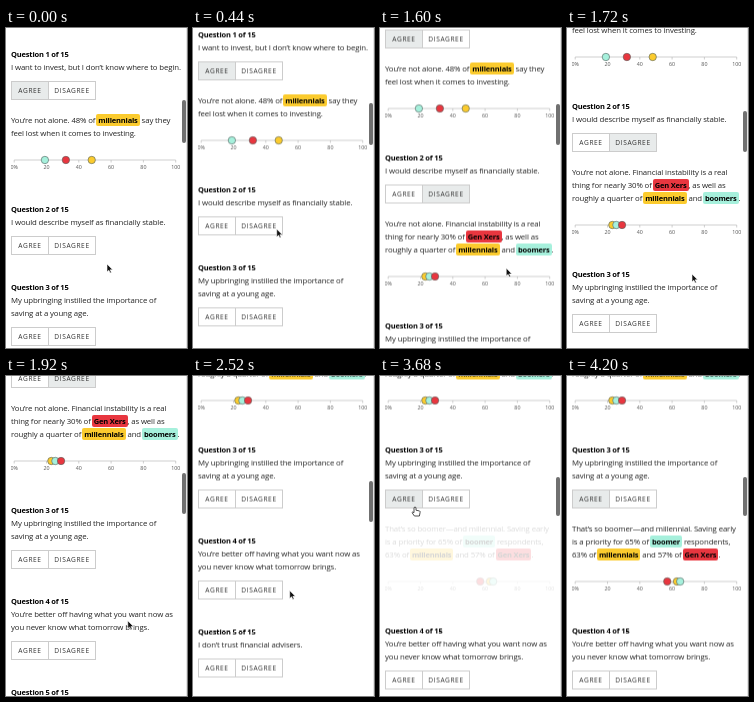
Write an HTML page that moves like this. It is 181x320 px and loops after 4.32 s.

```html
<!DOCTYPE html>
<html lang="en">
<meta charset="utf-8">
<style>
html, body { margin: 0; width: 100%; height: 100%; overflow: hidden; background: #fff; }
#stage { position: relative; width: 181px; height: 320px; overflow: hidden; color: #222;
  font: 7.8px/13px "Open Sans", "Noto Sans", sans-serif; letter-spacing: -.12px; white-space: nowrap; }
#page { position: absolute; left: 5px; top: 20px; will-change: transform; }
.q { margin-bottom: 26px; }
h2, b { font-size: 7.5px; font-weight: 700; letter-spacing: -.18px; color: #000; }
h2 { margin: 0; line-height: 13px; }
.buttons { display: flex; width: 85px; height: 19px; margin-top: 7px; box-sizing: border-box; border: 1px solid #ccc; }
.buttons span { width: 36px; font-size: 6.6px; line-height: 17px; letter-spacing: .6px; text-align: center; color: #333; }
.buttons span + span { flex: 1; border-left: 1px solid #ccc; }
.buttons .on { background: #e8ebeb; }
.answer { height: 0; overflow: hidden; opacity: 0; width: 171px; }
.answer p { margin: 14px 0 0; }
b { margin-left: -1px; padding: 1px 2px; border-radius: 2px; }
.answer svg { display: block; margin-top: 12px; }
.answer text { font-size: 5.3px; letter-spacing: 0; fill: #555; text-anchor: middle; }
#edge { position: absolute; right: 0; top: 0; width: 1px; height: 100%; background: #e4e4e4; }
#thumb { position: absolute; left: 176px; width: 4px; border-radius: 2px; background: #707070; }
#cursor { position: absolute; left: 0; top: 0; overflow: visible; }
</style>
<div id="stage">
  <div id="page"></div>
  <div id="edge"></div>
  <div id="thumb"></div>
  <svg id="cursor" width="12" height="14" stroke-linejoin="round">
    <path id="arrow" d="M0 0V8L1.9 6.3L3.1 9L4.4 8.4L3.2 5.8H5.7Z" fill="#111" stroke="#fff" stroke-width=".6"/>
    <path id="beam" d="M-1.8 -4.5Q0 -4.5 0 -3.2Q0 -4.5 1.8 -4.5M0 -3.2V3.2M-1.8 4.5Q0 4.5 0 3.2Q0 4.5 1.8 4.5M-1 1H1" fill="none" stroke="#222" stroke-width=".9"/>
    <path id="hand" d="M-1 .6Q0 -.6 1 .6V3.2L4.6 4Q5.3 4.3 5.1 5.4L4.4 9H-.6L-3 5.6Q-2.6 4.4 -1 5.6Z" fill="#fff" stroke="#222" stroke-width=".8"/>
  </svg>
</div>
<script>
const LOOP = 4320;
const colors = { yellow: '#fbcb2e', red: '#e8363f', mint: '#a6f0dc' };
const $ = id => document.getElementById(id);
const mark = (color, word) => `<b style="background:${colors[color]}">${word}</b>`;
const mill = mark('yellow', 'millennials'), xers = mark('red', 'Gen Xers');

const questions = [
  { text: ['I want to invest, but I don’t know where to begin.'], pick: 0, at: -1000,
    answer: [`You’re not alone. 48% of ${mill} say they`, 'feel lost when it comes to investing.'],
    dots: [['mint', 19], ['red', 32], ['yellow', 48]] },
  { text: ['I would describe myself as financially stable.'], pick: 1, at: 800,
    answer: ['You’re not alone. Financial instability is a real', `thing for nearly 30% of ${xers}, as well as`,
      `roughly a quarter of ${mill} and ${mark('mint', 'boomers')}.`],
    dots: [['yellow', 23], ['mint', 25.5], ['red', 29]] },
  { text: ['My upbringing instilled the importance of', 'saving at a young age.'], pick: 0, at: 3400,
    answer: ['That’s so boomer—and millennial. Saving early', `is a priority for 65% of ${mark('mint', 'boomer')} respondents,`,
      `63% of ${mill} and 57% of ${xers}.`],
    dots: [['red', 57], ['yellow', 63], ['mint', 65]] },
  { text: ['You’re better off having what you want now as', 'you never know what tomorrow brings.'] },
  { text: ['I don’t trust financial advisers.'] }
];

function chart(dots) {
  const x = v => 3.2 + v * 1.615;
  let s = `<path d="M${x(0)} 8H${x(100)}" stroke="#bbb" stroke-width=".7"/>`;
  for (let v = 0; v <= 100; v += 20)
    s += `<path d="M${x(v)} 8v2.5" stroke="#bbb" stroke-width=".7"/><text x="${x(v)}" y="17">${v || '0%'}</text>`;
  for (const [c, v] of dots)
    s += `<circle cx="${x(v)}" cy="8" r="3.7" fill="${colors[c]}" stroke="#52615d" stroke-width=".6"/>`;
  return `<svg width="171" height="20">${s}</svg>`;
}

$('page').innerHTML = questions.map((q, i) => `<div class="q"><h2>Question ${i + 1} of 15</h2>${q.text.join('<br>')}
  <div class="buttons"><span>AGREE</span><span>DISAGREE</span></div>
  <div class="answer">${q.answer ? `<p>${q.answer.join('<br>')}</p>${chart(q.dots)}` : ''}</div></div>`).join('');
questions.forEach((q, i) => {
  const el = $('page').children[i];
  q.buttons = el.querySelectorAll('.buttons span');
  q.box = el.querySelector('.answer');
});

const swing = p => .5 - Math.cos(Math.PI * p) / 2;
const linear = p => p;
const easeOut = p => 1 - (1 - p) ** 3;
const part = (t, start, length) => Math.min(1, Math.max(0, (t - start) / length));

// Each key is [time, value..., easing of the stretch that ends here]
function follow(keys, t) {
  let k = 1;
  while (k < keys.length - 1 && t > keys[k][0]) k++;
  const a = keys[k - 1], b = keys[k], n = a.length - 1;
  const p = b[n](part(t, a[0], b[0] - a[0]));
  return a.slice(1, n).map((v, i) => v + (b[i + 1] - v) * p);
}

const scrollKeys = [[0, 0, linear], [560, 22, swing], [1360, 22, linear], [1720, 102.5, p => p ** 2.5],
  [1920, 214.5, linear], [2280, 275.5, easeOut]];
const pointerKeys = [[0, 101, 236, linear], [580, 81, 195.5, swing], [860, 81, 195.5, linear], [1180, 130, 222, swing],
  [1360, 130, 222, linear], [1720, 125, 246, swing], [1920, 122, 245, linear], [2280, 96.5, 214, easeOut],
  [2500, 96.5, 214, linear], [2620, 99, 221, swing], [3040, 35, 131, swing]];
const pointerTypes = [[0, 'arrow'], [480, 'hand'], [960, 'arrow'], [1080, 'beam'], [1400, 'arrow'],
  [2920, 'hand'], [3960, '']];

function draw(t) {
  let height = 2343;
  for (const q of questions) {
    if (!q.answer) continue;
    const grown = (51 + 13 * q.answer.length) * swing(part(t, q.at, 200));
    height += grown;
    q.box.style.height = grown + 'px';
    q.box.style.opacity = swing(part(t, q.at + 170, 420));
    q.buttons[q.pick].classList.toggle('on', t >= q.at);
  }
  const [scroll] = follow(scrollKeys, t);
  $('page').style.transform = `translateY(${-scroll}px)`;
  $('thumb').style.top = (546 + scroll) * 320 / height + 'px';
  $('thumb').style.height = 320 * 320 / height + 'px';

  const [x, y] = follow(pointerKeys, t);
  const type = pointerTypes.filter(k => t >= k[0]).pop()[1];
  $('cursor').style.transform = `translate(${x}px, ${y}px)`;
  for (const id of ['arrow', 'beam', 'hand']) $(id).style.display = id === type ? '' : 'none';
}

const start = performance.now();
function tick() {
  draw((performance.now() - start) % LOOP);
  requestAnimationFrame(tick);
}
tick();
</script>
</html>
```
